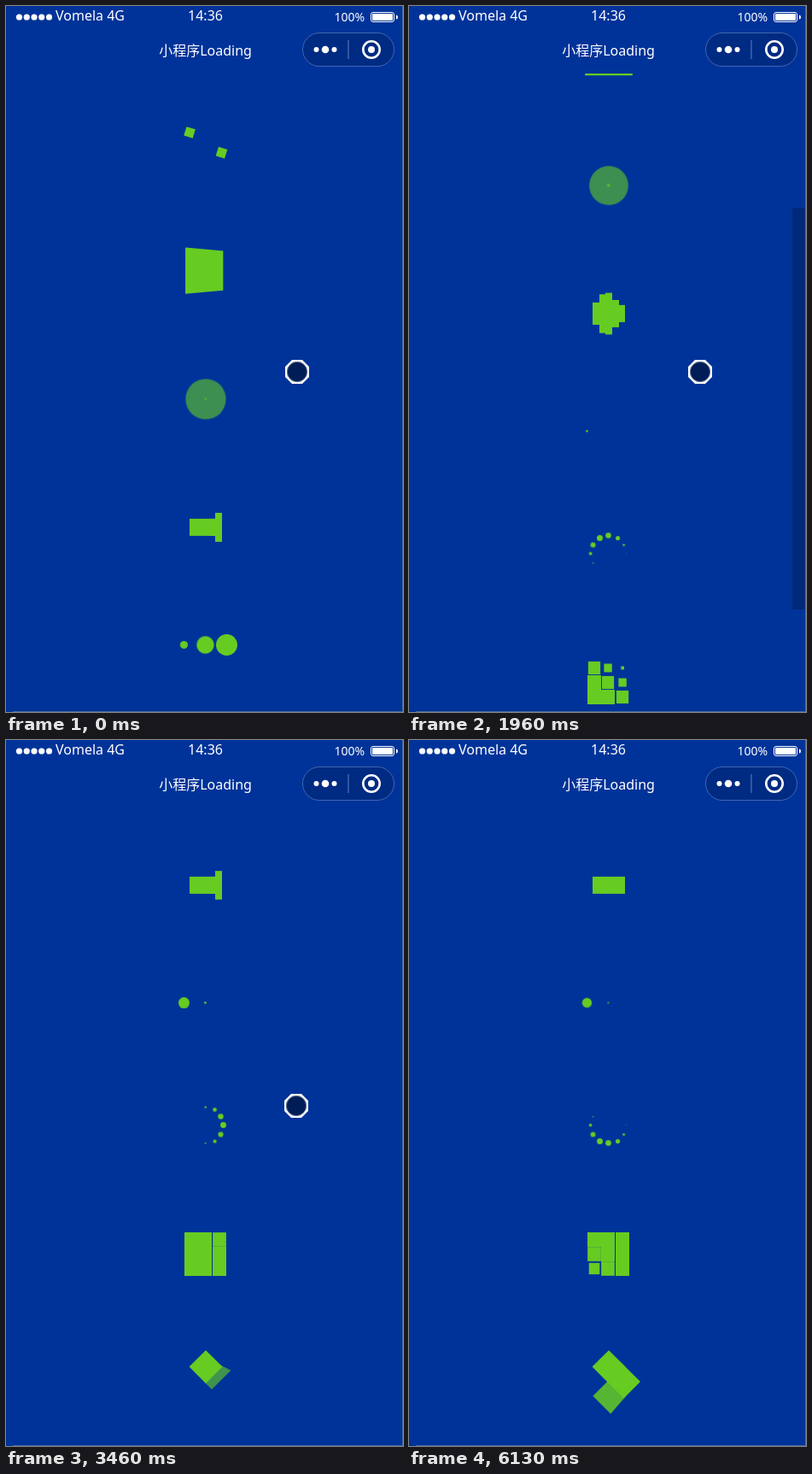
An HTML page that plays this animation: 465x826 px, repeating every 6230 ms.

```html
<!DOCTYPE html>
<html lang="zh">
<head>
<meta charset="utf-8">
<title>Loading</title>
<style>
html, body { margin: 0; width: 100%; height: 100%; overflow: hidden; background: #039; }
#view { position: absolute; top: 79px; left: 0; width: 465px; height: 747px; overflow: hidden; }
#page { position: absolute; top: -79px; left: 0; width: 465px; }
#page > div { position: absolute; left: 233.7px; }
#page > div > div { position: absolute; background: #6c2; }
#thumb { position: absolute; left: 449px; width: 15px; height: 470px; background: rgba(0, 0, 0, .2); }
svg { position: absolute; left: 0; top: 0; font-family: "Noto Sans", "Open Sans", "Noto Sans CJK SC", sans-serif; }

.cubes div { left: -24.8px; top: -24.8px; width: 12.4px; height: 12.4px; animation: wander 1.8s infinite ease-in-out paused; }
@keyframes wander {
  0% { transform: translate(0, 0) rotate(0deg) scale(1); }
  25% { transform: translate(37.2px, 0) rotate(-90deg) scale(.5); }
  50% { transform: translate(37.2px, 37.2px) rotate(-179deg) scale(1); }
  50.1% { transform: translate(37.2px, 37.2px) rotate(-180deg) scale(1); }
  75% { transform: translate(0, 37.2px) rotate(-270deg) scale(.5); }
  100% { transform: translate(0, 0) rotate(-360deg) scale(1); }
}

.plane div { left: -24.8px; top: -24.8px; width: 49.6px; height: 49.6px; animation: flip 1.2s infinite ease-in-out paused; }
@keyframes flip {
  0% { transform: perspective(149px) rotateX(0deg) rotateY(0deg); }
  50% { transform: perspective(149px) rotateX(-180.1deg) rotateY(0deg); }
  100% { transform: perspective(149px) rotateX(-180deg) rotateY(-179.9deg); }
}

.pulse div { left: -24.6px; top: -24.8px; width: 49.6px; height: 49.6px; border-radius: 50%; opacity: .6; animation: pulse 2s infinite ease-in-out paused; }
@keyframes pulse { 0%, 100% { transform: scale(0); } 50% { transform: scale(1); } }

.wave div { top: -24.8px; width: 7.65px; height: 49.6px; animation: wave 1.2s infinite ease-in-out paused; }
@keyframes wave { 0%, 40%, 100% { transform: scaleY(.4); } 20% { transform: scaleY(1); } }

.dots div { top: -12.4px; width: 24.8px; height: 24.8px; border-radius: 50%; animation: grow 1.4s infinite ease-in-out paused; }
.ring div { width: 7.44px; height: 7.44px; border-radius: 50%; animation: grow 1.2s infinite ease-in-out paused; }
@keyframes grow { 0%, 80%, 100% { transform: scale(0); } 40% { transform: scale(1); } }

.grid div { width: 16.4px; height: 16.8px; animation: shrink 1.3s infinite ease-in-out paused; }
@keyframes shrink { 0%, 70%, 100% { transform: scale(1); } 35% { transform: scale(0); } }

#page > .fold { transform: rotate(45deg); }
#page > .fold div { width: 24.8px; height: 24.8px; background: none; }
.fold i { position: absolute; inset: 0; background: #6c2; transform-origin: 100% 100%; animation: fold 2.4s infinite linear paused; animation-delay: inherit; }
@keyframes fold {
  0%, 10% { transform: perspective(174px) rotateX(-180deg) rotateY(0deg); opacity: 0; }
  25%, 75% { transform: perspective(174px) rotateX(0deg) rotateY(0deg); opacity: 1; }
  90%, 100% { transform: perspective(174px) rotateX(0deg) rotateY(180deg); opacity: 0; }
}
</style>
</head>
<body>
<div id="view"><div id="page"></div></div>
<div id="thumb"></div>
<svg width="465" height="826" viewBox="0 0 465 826" fill="#fff">
  <g id="signal"></g>
  <text x="58" y="17" font-size="16">Vomela 4G</text>
  <text x="233.5" y="17" font-size="16" text-anchor="middle">14:36</text>
  <text x="384.5" y="18" font-size="14">100%</text>
  <rect x="427.5" y="7.5" width="27" height="11" rx="2.5" fill="none" stroke="#fff"/>
  <rect x="429" y="9" width="24" height="8" rx="1"/>
  <path d="M457 10.5q2 0 2 2.5t-2 2.5z"/>
  <text x="233.5" y="58" font-size="16" font-weight="500" text-anchor="middle">小程序Loading</text>
  <rect x="347.5" y="31.5" width="107" height="39" rx="19.5" fill="#002b82" stroke="#4066b0"/>
  <circle cx="363.5" cy="51" r="3"/><circle cx="374" cy="51" r="4.3"/><circle cx="384.5" cy="51" r="3"/>
  <path d="M401 40v22" stroke="#4066b0" stroke-width="1.5"/>
  <circle cx="428" cy="51" r="9.7" fill="none" stroke="#fff" stroke-width="2.6"/>
  <circle cx="428" cy="51" r="4"/>
  <path d="M464.5 0V826M8 825.5H465" stroke="#466997" fill="none"/>
  <g id="cursor">
    <path d="M-6-14H6L14-6V6L6 14H-6L-14 6V-6Z"/>
    <circle r="11.7" fill="#001d57" stroke="#6b7790"/>
  </g>
</svg>
<script>
const $ = id => document.getElementById(id);
const LOOP = 6230, RATE = 1.041, START = 69165;

// How long each picture is held, in units of 10 ms
const HOLDS = [15, 15, 15, 12, 15, 12, 15, 15, 12, 15, 12, 15, 13, 15, 12, 15,
  15, 12, 12, 15, 15, 15, 12, 15, 12, 15, 12, 15, 12, 15, 12, 15, 12, 15, 12, 12,
  15, 15, 12, 15, 12, 12, 12, 15, 12, 10];
const SCROLL = [[0, 0], [1530, 28], [1680, 125], [1960, 250], [2500, 350], [2620, 375], [2770, 425], [2920, 440]];
const POINTER = [[0, 341, 428], [2380, 341, 428], [2500, 340, 428], [5080, 340, 428], [5230, 346, 445],
  [5350, 372, 520], [5500, 400, 620], [5740, 437, 770], [5860, 440, 810], [6010, 440, 828], [6130, 440, 860]];

for (let i = 0; i < 5; i++)
  $('signal').innerHTML += `<circle cx="${15.5 + i * 8.75}" cy="13" r="3.6"/>`;

function spinner(name, y, count, place) {
  const box = document.createElement('div');
  box.className = name;
  box.style.top = y + 'px';
  for (let i = 0; i < count; i++) {
    const part = document.createElement('div');
    const { x, y, delay = 0, turn } = place(i);
    if (x !== undefined) part.style.left = x + 'px';
    if (y !== undefined) part.style.top = y + 'px';
    part.style.animationDelay = delay + 's';
    if (turn !== undefined) {
      part.style.transform = `scale(1.1) rotate(${turn}deg)`;
      part.append(document.createElement('i'));
    }
    box.append(part);
  }
  $('page').append(box);
}

spinner('cubes', 160, 2, i => ({ delay: -.9 * i }));
spinner('plane', 310, 1, () => ({}));
spinner('pulse', 460, 2, i => ({ delay: -i }));
spinner('wave', 610, 5, i => ({ x: -18.8 + i * 7.6, delay: i * .1 - 1.2 }));
spinner('dots', 747.5, 3, i => ({ x: -37.4 + i * 24.9, delay: i * .16 - .32 }));
spinner('ring', 891, 12, i => ({
  x: 21.1 * Math.sin(i * Math.PI / 6) - 3.5,
  y: -21.1 * Math.cos(i * Math.PI / 6) - 3.72,
  delay: i * .1 - 1.2
}));
spinner('grid', 1041.2, 9, i => {
  const col = i % 3, row = i / 3 | 0;
  return { x: -24.7 + col * 16.4, y: -25.2 + row * 16.8, delay: (2 + col - row) / 10 };
});
spinner('fold', 1191, 4, i => {
  const order = [0, 1, 3, 2][i];
  return { x: (i % 2 - 1) * 24.8, y: ((i >> 1) - 1) * 24.8, turn: order * 90, delay: order * .3 };
});

const moves = document.getAnimations();

function heldTime(t) {
  let at = 0;
  for (const h of HOLDS) {
    if (t < at + h * 10) break;
    at += h * 10;
  }
  return at;
}

function pointerAt(t) {
  const n = POINTER.findIndex(p => p[0] > t);
  if (n < 0) return POINTER.at(-1).slice(1);
  const a = POINTER[n - 1], b = POINTER[n], p = (t - a[0]) / (b[0] - a[0]);
  return [1, 2].map(k => a[k] + (b[k] - a[k]) * p);
}

let shown = -1;
function draw() {
  const t = heldTime(performance.now() % LOOP);
  if (t !== shown) {
    shown = t;
    for (const m of moves) m.currentTime = START + t * RATE;
    const s = SCROLL.findLast(k => k[0] <= t)[1];
    $('page').style.top = -79 - s + 'px';
    $('thumb').style.top = Math.round(79 + s * 277 / 440) + 'px';
    $('thumb').style.display = t >= 1530 && t < 3340 ? 'block' : 'none';
    $('cursor').setAttribute('transform', `translate(${pointerAt(t)})`);
  }
  requestAnimationFrame(draw);
}
draw();
</script>
</body>
</html>
```
